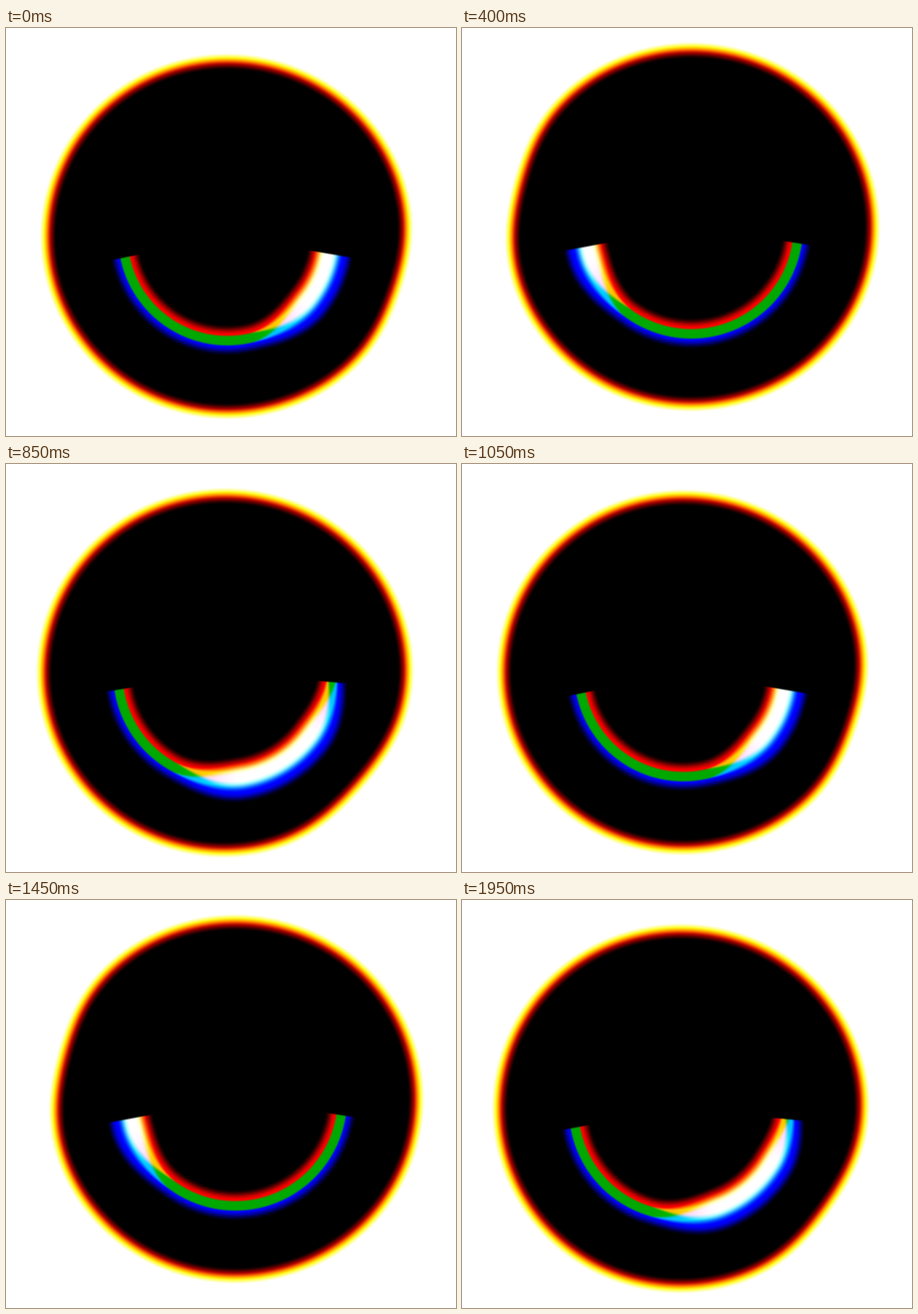
An HTML page with a canvas for the animation above (2000 ms loop, 660 px wide and 599 px high).

```html
<!DOCTYPE html>
<html lang="en">
<head>
<meta charset="utf-8">
<title>Wobbling smile</title>
<style>
html, body { margin: 0; width: 100%; height: 100%; overflow: hidden; background: #fff; }
canvas { display: block; }
</style>
</head>
<body>
<canvas id="stage" width="660" height="599"></canvas>
<script>
const W = 660, H = 599, LOOP = 2000, STEP = 50, PERIOD = 1050;
const ctx = document.getElementById('stage').getContext('2d');
const img = ctx.createImageData(W, H);
const px = img.data;

// time, centre x, centre y, radius, dent angle, dent depth,
// swelling start, swelling end, right lip angle, left lip angle
const poses = [
  [0, 324.5, 306, 272, 18, 6, -30, 50, 9.7, 168.4],
  [200, 337, 293, 276, -130, 11, -120, -25, 10.6, 164.3],
  [600, 332, 295, 273, -195, 4, -285, -145, 6.5, 174.4],
  [850, 321.5, 306.5, 275, -320, 11, -335, -268, 5, 171],
  [900, 321.2, 306, 275, -326, 9, -340, -280, 5.8, 169.7]
];
const TURNING = [4, 6, 7];

const clamp = v => v < 0 ? 0 : v > 1 ? 1 : v;
const mix = (a, b, k) => a + (b - a) * k;
const ease = v => { v = clamp(v); return v * v * (3 - 2 * v); };
const wrap = a => a - 360 * Math.round(a / 360);

// Pose i of the endless sequence; turning angles drop by 360 each period.
function pose(i) {
  const n = poses.length, lap = Math.floor(i / n);
  const p = poses[i - lap * n].slice();
  p[0] += lap * PERIOD;
  for (const k of TURNING) p[k] -= lap * 360;
  return p;
}

// Smooth curve through the poses.
function poseAt(t) {
  let i = poses.length - 1;
  while (poses[i][0] > t) i--;
  const [a, b, c, d] = [-1, 0, 1, 2].map(k => pose(i + k));
  const span = c[0] - b[0], u = (t - b[0]) / span, u2 = u * u, u3 = u2 * u;
  return b.map((v, k) => {
    const m0 = (c[k] - a[k]) / (c[0] - a[0]) * span;
    const m1 = (d[k] - b[k]) / (d[0] - b[0]) * span;
    return v * (2 * u3 - 3 * u2 + 1) + m0 * (u3 - 2 * u2 + u)
      + c[k] * (3 * u2 - 2 * u3) + m1 * (u3 - u2);
  });
}

// Brightness between two radii, each with its own softness.
const band = (r, inner, softIn, outer, softOut) =>
  255 * ease((r - inner) / softIn) * ease((outer - r) / softOut);

function draw(t) {
  const [, cx, cy, radius, dent, depth, from, to, right, left] = poseAt(t % PERIOD);
  const middle = (from + to) / 2, half = (to - from) / 2;
  const dentWidth = 12 + depth;
  const shift = (radius - 274) * 1.5;
  for (let y = 0, i = 0; y < H; y++) {
    const dy = y + 0.5 - cy;
    for (let x = 0; x < W; x++, i += 4) {
      const dx = x + 0.5 - cx, r = Math.sqrt(dx * dx + dy * dy);
      let red = 0, green = 0, blue = 0;
      if (r > 295) {
        red = green = blue = 255;
      } else if (r > 215) {
        // Rim: the dark disc is largest in blue and smallest in red.
        const a = Math.atan2(dy, dx) * 180 / Math.PI;
        const d = wrap(a - dent) / dentWidth;
        const edge = radius + 3 * (dx * dx - dy * dy) / (r * r) - depth * Math.exp(-d * d);
        const inside = edge - r;
        red = 255 * ease((25 - inside) / 15);
        green = 255 * ease((17 - inside) / 12);
        blue = 255 * ease((9 - inside) / 10);
      } else if (r > 110 && r < 205 && dy > 0) {
        // Smile: three bands that swell into white.
        const a = Math.atan2(dy, dx) * 180 / Math.PI;
        const lip = clamp(Math.min(a - right, left - a) + 0.5);
        if (lip > 0) {
          const h = ease((half - Math.abs(wrap(a - middle))) / 40 + 0.7);
          const s = r - shift, sharp = mix(4, 14, h);
          red = lip * band(s, mix(132, 121, h), 16, mix(151, 172, h), sharp);
          green = lip * mix(0.66, 1, h) * band(s, mix(147, 131, h), sharp, mix(165, 176, h), sharp);
          blue = lip * band(s, mix(161, 135, h), sharp, mix(179, 192, h), 16);
        }
      }
      px[i] = red;
      px[i + 1] = green;
      px[i + 2] = blue;
      px[i + 3] = 255;
    }
  }
  ctx.putImageData(img, 0, 0);
}

const start = performance.now();
let shown = -1;
function tick() {
  const t = Math.floor((performance.now() - start) % LOOP / STEP) * STEP;
  if (t !== shown) draw(shown = t);
  requestAnimationFrame(tick);
}
tick();
</script>
</body>
</html>
```
